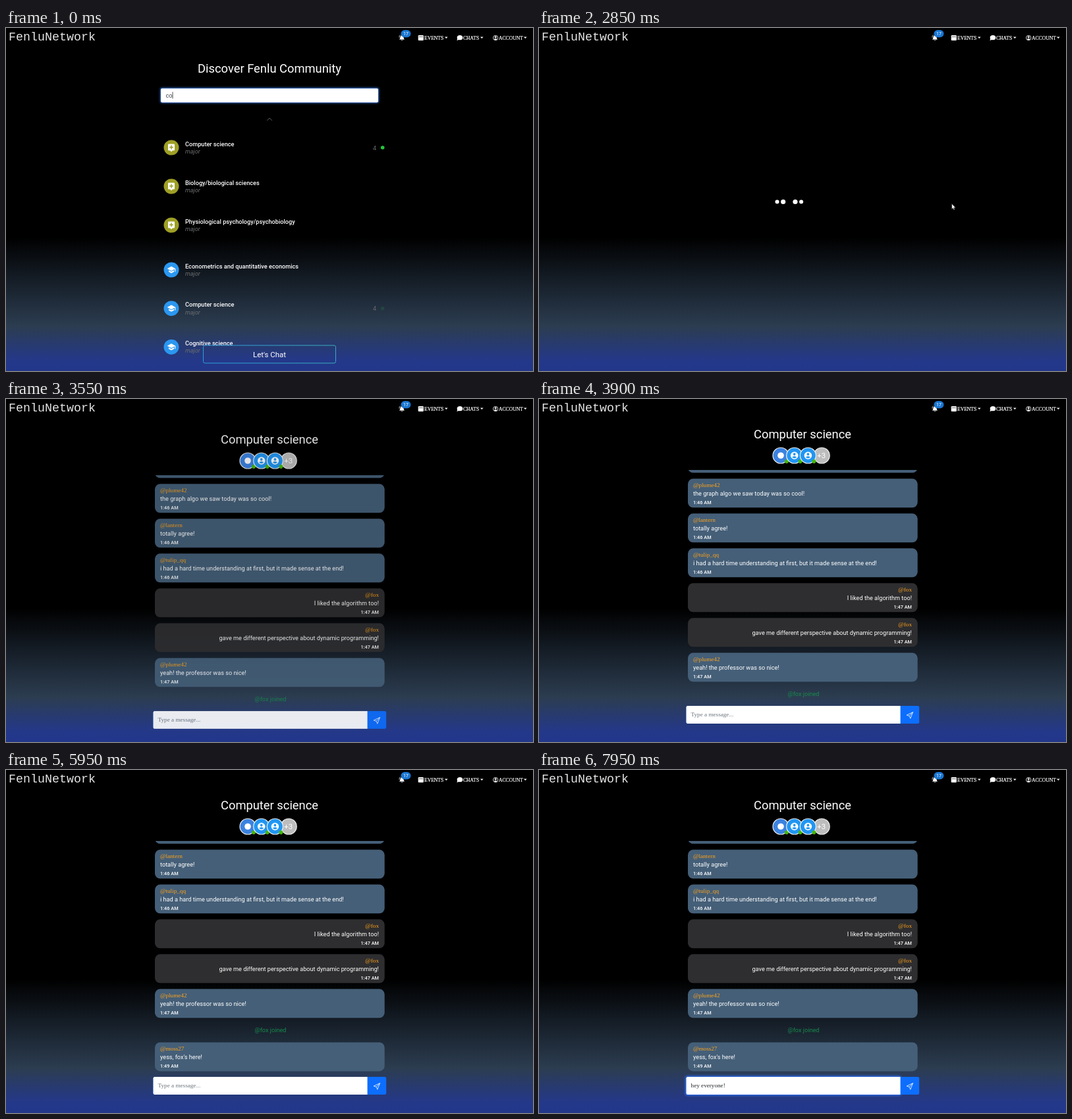
These frames come from a looping animation (800x522 px, 8000 ms). An HTML page:

```html
<!DOCTYPE html>
<html lang="en">
<head>
<meta charset="utf-8">
<title>Community chat</title>
<style>
html, body { margin: 0; width: 100%; height: 100%; overflow: hidden; background: #000; }
svg { display: block; width: 100%; height: 100%; }
text { font: 9.17px Roboto, sans-serif; fill: #fff; white-space: pre; }
.logo { font: 18.33px "Liberation Mono", monospace; fill: #e4e4e4; }
.nav { font: 7.65px "Liberation Serif", serif; stroke: #fff; stroke-width: .2; }
.title { font-size: 18.33px; }
.medium { font-weight: 500; }
.kind { font-style: italic; fill: #6c6e70; }
.count { fill: #65686b; }
.big { font-size: 11.46px; }
.user { font-family: "Liberation Serif", serif; fill: #ffa31a; }
.time { font-size: 7.33px; font-weight: 500; }
.field { font-family: "Liberation Serif", serif; fill: #6c757d; }
.query { fill: #444b52; }
.joined { fill: #178a4b; }
.mid { text-anchor: middle; }
.end { text-anchor: end; }
</style>
</head>
<body>
<svg viewBox="0 0 800 522" preserveAspectRatio="none">
  <defs>
    <linearGradient id="sky" x2="0" y2="1">
      <stop offset=".61" stop-color="#000"/>
      <stop offset=".87" stop-color="#2c3d51"/>
      <stop offset=".97" stop-color="#24388a"/>
      <stop offset="1" stop-color="#22378a"/>
    </linearGradient>
    <linearGradient id="edge">
      <stop stop-color="#2b9ddd"/>
      <stop offset="1" stop-color="#38aebb"/>
    </linearGradient>
    <filter id="soft" x="-5%" y="-30%" width="110%" height="160%"><feGaussianBlur stdDeviation="1.4"/></filter>
    <clipPath id="log"><rect x="220" y="108" width="360" height="352"/></clipPath>
    <g id="person">
      <circle r="5.8" fill="#fff"/>
      <circle cy="-2" r="1.9" fill="#2196f3"/>
      <path d="M-3.6 2.6Q0-.8 3.6 2.6Q0 6 -3.6 2.6Z" fill="#2196f3"/>
    </g>
    <g id="major">
      <circle r="11.5" fill="#9e9f25"/>
      <path d="M-4-5.5H4Q5-5.5 5-4.5V3.5Q5 4.5 4 4.5H1.8L0 6.4-1.8 4.5H-4Q-5 4.5-5 3.5V-4.5Q-5-5.5-4-5.5Z" fill="#fff"/>
      <path d="M-3-.5H3M0-3.5V2.5" stroke="#9e9f25" stroke-width="1.5"/>
    </g>
    <g id="school">
      <circle r="11.5" fill="#2b97f0"/>
      <path transform="scale(.573) translate(-12 -12)" fill="#fff" d="M5 13.2v4L12 21l7-3.8v-4L12 17ZM12 3 1 9l11 6 9-4.9V17h2V9Z"/>
    </g>
  </defs>
  <rect width="800" height="522" fill="url(#sky)"/>
  <g id="header"></g>
  <g id="search"></g>
  <g id="loader" fill="#fff"></g>
  <g id="chat"></g>
  <path id="hand" fill="#fff" stroke="#222" stroke-width=".6" d="M-1 0Q0-1 1 0V3.5L4 4.4Q5 4.8 4.7 6.2L4 10H-.6L-3.2 6.4Q-3-.0 -1 6Z"/>
  <path id="arrow" fill="#fff" stroke="#222" stroke-width=".5" d="M0 0V8L1.8 6.4 3 9.2 4.3 8.6 3.1 5.9H5.6Z"/>
</svg>
<script>
const LOOP = 8000, PAGE_LEAVES = 2500, CHAT_ENTERS = 3250;
const $ = id => document.getElementById(id);
const clamp = v => Math.min(1, Math.max(0, v));
const progress = (t, start, length) => clamp((t - start) / length);
const easeInOut = p => p * p * (3 - 2 * p);
const show = (el, on) => el.setAttribute('visibility', on ? 'inherit' : 'hidden');
const place = (el, x, y) => el.setAttribute('transform', `translate(${x} ${y})`);

const text = (x, y, cls, str, id = '') => `<text id="${id}" x="${x}" y="${y}" class="${cls}">${str}</text>`;
const box = (x, y, w, h, r, attrs) => `<rect x="${x}" y="${y}" width="${w}" height="${h}" rx="${r}" ${attrs}/>`;
const dot = (x, y, r, attrs) => `<circle cx="${x}" cy="${y}" r="${r}" ${attrs}/>`;
const path = (d, attrs) => `<path d="${d}" ${attrs}/>`;
const WHITE = 'fill="#fff"';

const menu = (x, label, arrowX) =>
  text(x, 17.6, 'nav', label) + path(`M${arrowX} 13.4h4.6l-2.3 2.5z`, WHITE);

$('header').innerHTML =
  text(4, 19, 'logo', 'FenluNetwork') +
  path('M597 17.5Q598.5 16 598.5 13.5Q599 11 601 11Q603.5 11 603.5 14Q603.7 16 605 17.5ZM599.8 18.2h2.6q-1.3 1.8-2.6 0', WHITE) +
  path('M597 14.5Q596.8 12 598.5 10.5', 'fill="none" stroke="#fff" stroke-width=".8"') +
  box(599.5, 3, 15, 11.2, 5.6, 'fill="#1976d2"') +
  '<text x="607" y="11.2" class="mid" style="font-size:7px">17</text>' +
  box(625.7, 11, 8.2, 8, 1.2, WHITE) + path('M626.5 13.3h6.6', 'stroke="#222" stroke-width=".7"') +
  menu(635, 'EVENTS', 666) +
  '<ellipse cx="689" cy="14.7" rx="4.3" ry="3.6" fill="#fff"/>' + path('M685.6 15.5L684.4 19L688 17.8Z', WHITE) +
  menu(694, 'CHATS', 720) +
  dot(743.2, 15, 3.7, 'fill="none" stroke="#fff" stroke-width=".8"') + dot(743.2, 13.8, 1.5, WHITE) +
  path('M740.8 17Q743.2 14.8 745.6 17Q743.2 19.4 740.8 17Z', WHITE) +
  menu(748, 'ACCOUNT', 786);

// online: phase of the blinking presence dot
const row = (y, icon, name, online) =>
  `<use href="#${icon}" x="251" y="${y}"/>` +
  text(272, y - 2.4, 'medium', name) + text(272, y + 9, 'kind', 'major') +
  (online === undefined ? '' : text(557, y + 3.5, 'count', '4') +
    dot(571.7, y, 2.8, `fill="#22c83a" class="online" data-phase="${online}"`));

$('search').innerHTML =
  text(400, 68.4, 'title mid', 'Discover Fenlu Community') +
  box(233.8, 90.8, 332.4, 23.4, 3, 'fill="#2456a8" filter="url(#soft)"') +
  box(235, 92, 330, 21.3, 2, 'fill="#fff" stroke="#86b7fe" stroke-width=".5"') +
  text(242.5, 105.5, 'query', '', 'query') + path('M0 97.3V107.5', 'id="caret" stroke="#222" stroke-width=".8"') +
  path('M396.3 140.8L400 137L403.7 140.8', 'fill="none" stroke="#666" stroke-width=".9"') +
  row(182, 'major', 'Computer science', 0) +
  row(241, 'major', 'Biology/biological sciences') +
  row(300, 'major', 'Physiological psychology/psychobiology') +
  '<g id="broad">' +
  row(368, 'school', 'Econometrics and quantitative economics') +
  row(426.7, 'school', 'Computer science', .33) +
  row(485.4, 'school', 'Cognitive science') + '</g><g id="narrow">' +
  row(368, 'school', 'Computer science', .75) +
  row(426.7, 'school', 'Computer engineering') + '</g>' +
  box(299.5, 483, 201, 27, 2.5, 'fill="none" stroke="url(#edge)"') +
  text(400, 500.5, 'big mid', "Let's Chat");

const message = (y, user, words, time, own) => {
  const x = own ? 566 : 234, side = own ? ' end' : '';
  return box(226, y, 348.7, 44, 8, `fill="${own ? '#2e2e30' : '#455f78'}"`) +
    text(x, y + 12.6, 'user' + side, '@' + user) +
    text(x, y + 26, side, words) + text(x, y + 38.4, 'time' + side, time + ' AM');
};
const avatar = (x, fill, inner, online) =>
  dot(x, 86, 12, `fill="${fill}" stroke="#eee" stroke-width="1.2"`) + inner +
  (online ? dot(x + 9, 95, 2.9, 'fill="#44b700"') : '');
const person = x => avatar(x, '#2196f3', `<use href="#person" x="${x}" y="86"/>`, true);

const talk = [
  ['', '', ''],
  ['plume42', 'the graph algo we saw today was so cool!', '1:46'],
  ['lantern', 'totally agree!', '1:46'],
  ['tulip_qq', 'i had a hard time understanding at first, but it made sense at the end!', '1:46'],
  ['fox', 'I liked the algorithm too!', '1:47', true],
  ['fox', 'gave me different perspective about dynamic programming!', '1:47', true],
  ['plume42', 'yeah! the professor was so nice!', '1:47'],
];

$('chat').innerHTML =
  text(400, 59.5, 'title mid', 'Computer science') +
  avatar(429.2, '#bdbdbd', text(428.8, 90.2, 'big mid', '+3')) +
  avatar(367, '#3b82e0', dot(367, 86, 4.8, WHITE), true) + person(387.7) + person(408.4) +
  '<g clip-path="url(#log)"><g id="thread">' +
  talk.map((m, i) => message(68.3 + 53 * i, ...m)).join('') +
  text(401.5, 451.6, 'joined mid', '@fox joined') +
  message(467.4, 'moss27', "yess, fox's here!", '1:49') + '</g></g>' +
  box(222, 465.6, 328, 29.8, 3.5, 'id="glow" fill="#2b6cf0" filter="url(#soft)"') +
  box(223.5, 467, 353.7, 27, 2.3, 'fill="#0d6efd"') +
  path('M548.6 467V494H225.8Q223.5 494 223.5 491.7V469.3Q223.5 467 225.8 467Z', WHITE) +
  text(230.6, 483.2, 'field', '', 'draft') +
  path('M558.2 481L567.6 476.6L563.8 486.2L562.2 482.4ZM562.2 482.4L567.6 476.6', 'fill="none" stroke="#fff" stroke-width=".8" stroke-linejoin="round"');

$('loader').innerHTML = '<circle/>'.repeat(4);
const loaderDots = [...$('loader').children];
const onlineDots = [...document.querySelectorAll('.online')];

// cubic-bezier(0, 1, 1, 0): rushes, lingers halfway, rushes again
function lingering(x) {
  let lo = 0, hi = 1;
  for (let i = 0; i < 20; i++) {
    const s = (lo + hi) / 2;
    if (s * s * (3 - 2 * s) < x) lo = s; else hi = s;
  }
  return 3 * lo - 6 * lo * lo + 4 * lo ** 3;
}

function drawSearch(t) {
  const query = 'computer'.slice(0, 2 + Math.min(6, Math.floor(t / 180)));
  $('query').textContent = query;
  $('caret').setAttribute('transform', `translate(${243 + $('query').getComputedTextLength()} 0)`);
  show($('caret'), t < 1580 || (t - 1580) % 1000 >= 500);
  show($('broad'), t < 400);
  show($('narrow'), t >= 400);
  for (const el of onlineDots) {
    const wave = .5 + .5 * Math.cos(2 * Math.PI * (t / 2000 + +el.dataset.phase));
    el.setAttribute('opacity', wave ** 1.4);
  }
}

function drawLoader(t) {
  const p = lingering((t - 2550 + LOOP * 3) % 600 / 600), step = 18.3, left = 361.5;
  const dots = [[left, p], [left + step * p, 1], [left + step * (1 + p), 1], [left + 2 * step, 1 - p]];
  dots.forEach(([x, size], i) => {
    loaderDots[i].setAttribute('cx', x);
    loaderDots[i].setAttribute('cy', 264.5);
    loaderDots[i].setAttribute('r', 3.6 * Math.max(0, size) ** .25);
  });
}

function drawChat(t) {
  const entered = 1 - (1 - progress(t, CHAT_ENTERS, 560)) ** 3;
  $('chat').setAttribute('opacity', entered);
  place($('chat'), 0, 80 * (1 - entered));
  place($('thread'), 0, -53 * easeInOut(progress(t, 5500, 250)));
  show($('glow'), t >= 6900);
  const typed = 'hey everyone!'.slice(0, Math.max(0, Math.floor((t - 7000) / 65)));
  $('draft').textContent = typed || 'Type a message...';
  $('draft').style.fill = typed ? '#212529' : '';
}

function drawPointer(t) {
  const arrive = easeInOut(progress(t, 1150, 250)), leave = easeInOut(progress(t, 2550, 250));
  show($('hand'), t >= 1150 && t < PAGE_LEAVES);
  show($('arrow'), t >= PAGE_LEAVES && t < 3300);
  place($('hand'), 430 - 73 * arrive, 300 + 55 * arrive);
  place($('arrow'), 356 + 270.7 * leave, 355 - 87.4 * leave);
}

function frame() {
  const t = performance.now() % LOOP;
  show($('search'), t < PAGE_LEAVES);
  show($('loader'), t >= PAGE_LEAVES && t < CHAT_ENTERS);
  show($('chat'), t >= CHAT_ENTERS);
  if (t < PAGE_LEAVES) drawSearch(t);
  else if (t < CHAT_ENTERS) drawLoader(t);
  else drawChat(t);
  // children toggle themselves, so they must not outlive their page
  if (t >= PAGE_LEAVES) ['caret', 'broad', 'narrow'].forEach(id => show($(id), false));
  drawPointer(t);
  requestAnimationFrame(frame);
}
frame();
</script>
</body>
</html>
```
